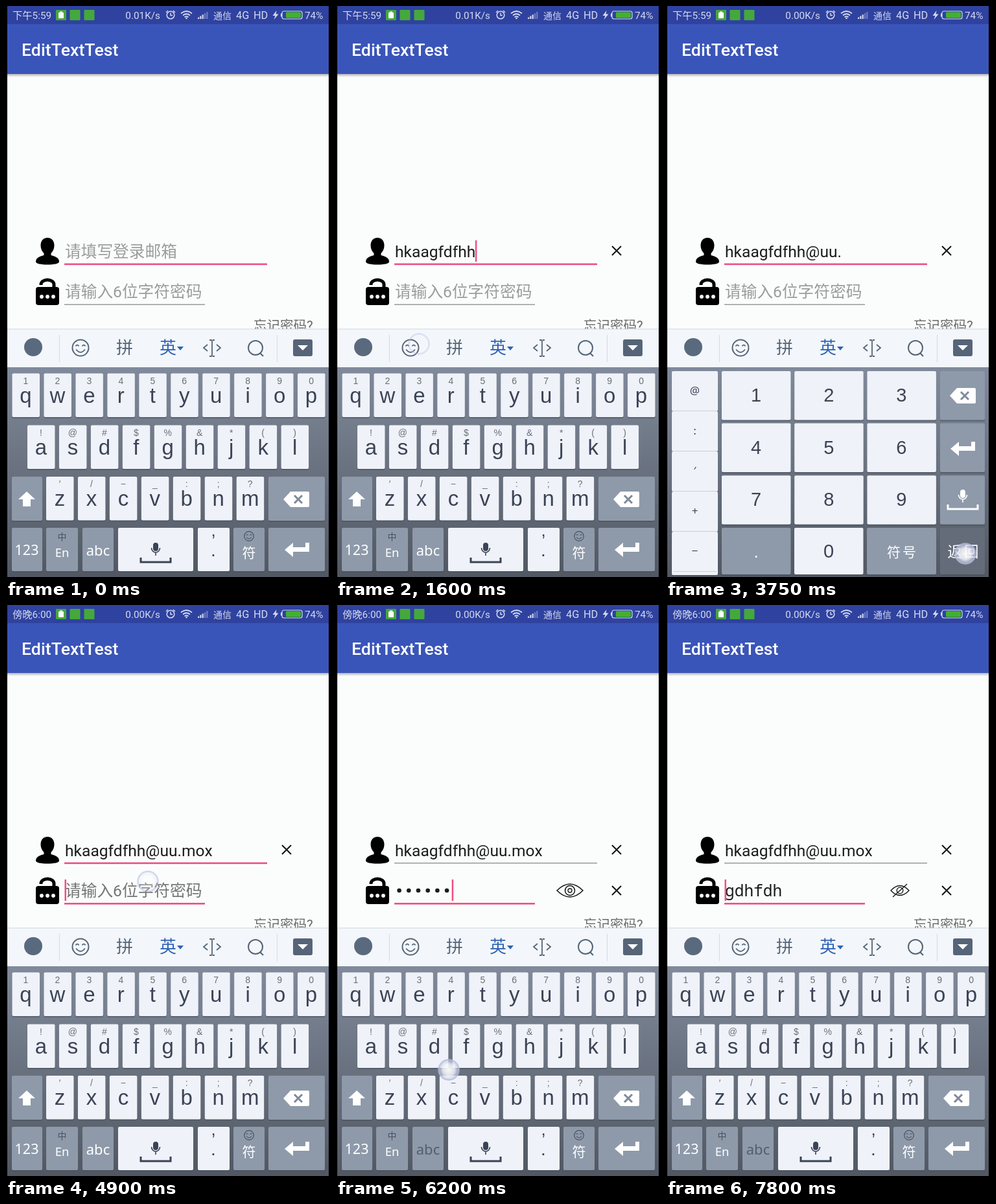
An HTML page that plays this animation: 500 px wide and 882 px high, repeating every 8000 ms.

```html
<!DOCTYPE html>
<html lang="zh">
<head>
<meta charset="utf-8">
<style>
html, body { margin: 0; width: 100%; height: 100%; overflow: hidden; background: #000; }
svg { display: block; width: 500px; height: 882px; font-family: Roboto, 'Noto Sans CJK SC', 'Noto Sans CJK', sans-serif; }
.key { font-family: 'Liberation Sans', 'Noto Sans CJK SC', 'Noto Sans CJK', sans-serif; }
.fn { font-family: 'Noto Sans', 'Noto Sans CJK SC', 'Noto Sans CJK', sans-serif; }
.mono { font-family: 'Noto Sans Mono', monospace; }
</style>
</head>
<body>
<svg id="stage" viewBox="0 0 500 882"></svg>
<script>
const LOOP = 8000, HOLD = 70, FADE = 180;
const INK = '#3b4356', SLATE = '#566477', BLUE = '#2f63b5', PINK = '#f0507f';
const LIGHT = '#eff2f8', GREY = '#8e9aaa', PRESSED = '#646c79';
const keys = {};

const rect = (x, y, w, h, fill, more = '') =>
  `<rect x="${x}" y="${y}" width="${w}" height="${h}" fill="${fill}" ${more}/>`;
const circle = (x, y, r, fill, more = '') =>
  `<circle cx="${x}" cy="${y}" r="${r}" fill="${fill}" ${more}/>`;
const line = (d, stroke, width = 2, more = '') =>
  `<path d="${d}" fill="none" stroke="${stroke}" stroke-width="${width}" ${more}/>`;
const shape = (d, fill) => `<path d="${d}" fill="${fill}"/>`;
const text = (x, y, size, str, fill, more = '') =>
  `<text x="${x}" y="${y}" font-size="${size}" fill="${fill}" ${more}>${str}</text>`;
const mid = (x, y, size, str, fill, more = '') =>
  text(x, y, size, str, fill, `text-anchor="middle" ${more}`);
const group = (id, inner) => `<g id="${id}">${inner}</g>`;

// A keyboard key; a name makes it pressable.
function key(x, y, w, h, fill, name) {
  if (name) keys[name] = { x: x + w / 2, y, h, fill };
  return rect(x, y + 2, w, h, '#4a515d', 'rx="2" opacity=".6"') +
    rect(x, y, w, h, fill, `rx="2" ${name ? `id="key-${name}"` : ''}`);
}

const enterIcon = (x, y) =>
  shape(`M${x - 19} ${y} l13 -11 v7 h19 v-7 h6 v14 h-25 v8z`, '#fff');
const eraseIcon = (x, y) =>
  shape(`M${x - 20} ${y} l11 -12 h27 q2 0 2 2 v20 q0 2 -2 2 h-27z`, '#fff') +
  line(`M${x - 3} ${y - 6} l12 12 m0 -12 l-12 12`, '#7f8a9a', 3);
const micIcon = (x, y, fill, half) =>
  rect(x - 4, y - 9, 8, 13, fill, 'rx="4"') +
  line(`M${x - 6.5} ${y - 1} a6.5 7 0 0 0 13 0 M${x} ${y + 6} v5`, fill, 1.6) +
  line(`M${x - half} ${y + 14} v7 h${2 * half} v-7`, fill, 3);
const smile = (x, y, r, stroke, width) =>
  circle(x, y, r, 'none', `stroke="${stroke}" stroke-width="${width}"`) +
  line(`M${x - r * .55} ${y + r * .2} q${r * .55} ${r * .7} ${r * 1.1} 0
    M${x - r * .6} ${y - r * .2} q${r * .2} ${-r * .3} ${r * .4} 0
    M${x + r * .2} ${y - r * .2} q${r * .2} ${-r * .3} ${r * .4} 0`, stroke, width * .9);
const cross = y => line(`M426 ${y - 7} l14 14 m0 -14 l-14 14`, '#111', 2);

function statusBar() {
  const c = '#d5daf0';
  const face = x => rect(x, 6, 16, 16, '#45a83c', 'rx="1"');
  let s = rect(2, 0, 496, 28, '#2f429f') +
    `<text id="clock" x="10" y="20" font-size="15.3" fill="${c}"></text>` +
    face(77) + rect(81, 10, 8, 9, '#fff', 'rx="1"') + rect(83, 8.5, 4, 2, '#fff') +
    face(98.5) + face(120.5) +
    `<text id="speed" x="238" y="20" font-size="15.3" fill="${c}" text-anchor="end"></text>` +
    circle(254, 14, 5.8, 'none', `stroke="${c}" stroke-width="1.5"`) +
    line('M254 10.5 v4 h3 M247 10 l3 -3 M261 10 l-3 -3', c, 1.4) +
    line('M270 11.5 q8.5 -7 17 0 M273 14.5 q5.500 -4.500 11 0 M275.500 17.300 q3 -2.500 6 0', c, 1.7) +
    circle(278.5, 19, 1.3, c);
  for (let i = 0; i < 5; i++)
    s += rect(296 + i * 3.3, 17.5 - i * 2.1, 2.2, 2.5 + i * 2.1, c, i > 2 ? 'opacity=".4"' : '');
  return s + text(320, 19.5, 14, '通信', c) + text(355, 20, 16.3, '4G', c) + text(382, 20, 16.3, 'HD', c) +
    shape('M417.500 7 l-6 8 h4 l-2 6 l7 -8.500 h-4z', c) +
    rect(426, 8, 31, 12, 'none', `rx="3" stroke="${c}" stroke-width="1.2"`) +
    rect(424, 11.5, 2, 5, c) + rect(432, 9.5, 23, 9, '#43b02e', 'rx="1.5"') +
    text(461, 20, 15.3, '74%', c);
}

function form() {
  let dots = '';
  for (let i = 0; i < 6; i++) dots += circle(97.6 + i * 14.7, 441, 3.3, '#1c1c1c', `id="dot${i}"`);
  return rect(2, 28, 496, 77, '#3a55b9') +
    rect(2, 105, 496, 5, 'url(#shade)') +
    text(24, 77, 26.7, 'EditTextTest', '#fff', 'font-weight="500"') +
    shape('M64 358 c7 0 10.500 5 10.500 12 c0 5 -2 9 -5 12 v3 c7 2 12.500 4 12.500 10 c0 3 -8 4.500 -18 4.500 ' +
      's-18 -1.500 -18 -4.500 c0 -6 5.500 -8 12.500 -10 v-3 c-3 -3 -5 -7 -5 -12 c0 -7 3.500 -12 10.500 -12z', '#000') +
    line('M54 431 v-1 a10 7 0 0 1 20 0 v7', '#000', 5) +
    rect(46, 434, 36, 28, '#000', 'rx="4"') +
    [55, 64, 73].map(x => circle(x, 449, 2.9, '#fff')).join('') +
    text(91, 388, 24.7, '请填写登录邮箱', '#9b9b9b', 'id="mailHint"') +
    text(91, 388, 24.6, '', '#1c1c1c', 'id="mail"') + group('mailX', cross(378)) +
    rect(90, 397.5, 313, 2.6, PINK, 'id="mailLine"') +
    text(91, 450, 24.7, '请输入6位字符密码', '#9b9b9b', 'id="passHint"') +
    text(91, 450, 24.5, '', '#1c1c1c', 'id="pass" class="mono"') + group('dots', dots) +
    rect(90, 460, 217, 2.6, PINK, 'id="passLine"') +
    group('passX', cross(441)) +
    group('eye', line('M341 441 q20 -20 40 0 q-20 20 -40 0z', '#111', 1.5) +
      circle(361, 441, 7.5, 'none', 'stroke="#111" stroke-width="1.5"') +
      circle(361, 441, 3, 'none', 'stroke="#111" stroke-width="1.3"')) +
    group('eyeOff', line('M347 441 q14 -15 28 0 q-14 15 -28 0z M350 451 l22 -20', '#111', 1.3) +
      circle(361, 441, 4.8, 'none', 'stroke="#111" stroke-width="1.3"')) +
    rect(0, 0, 2.5, 33, PINK, 'id="caret"') +
    text(382, 500.5, 20.5, '忘记密码?', '#6a6a6a');
}

function strip() {
  return rect(2, 499, 496, 59, '#f3f7fb') + rect(2, 498.5, 496, 1, '#cfd6dc') +
    group('tools', circle(42, 527, 14, '#5a6a7e') +
      line('M82.500 508 v42 M418.500 508 v42', '#d3dae2', 1) +
      smile(115, 528, 12.5, SLATE, 2) +
      mid(183, 537, 26, '拼', SLATE) + mid(250, 537, 26, '英', BLUE) +
      shape('M264 526 h10 l-5 6z', BLUE) +
      line('M314 516 h3 q1 0 1 2 v21 q0 2 -1 2 h-3 M322 516 h-3 M322 541 h-3', SLATE, 1.8) +
      line('M311 523 l-6 5 l6 5 M325 523 l6 5 l-6 5', SLATE, 1.8) +
      circle(385, 528, 11, 'none', `stroke="${SLATE}" stroke-width="2"`) +
      line('M392 536 l5 5', SLATE, 2.2) +
      rect(443, 515, 30, 26, SLATE, 'rx="3"') + shape('M450 524 h16 l-8 8z', '#fff')) +
    text(24, 540, 30.7, '', BLUE, 'id="word"');
}

function letters() {
  let s = '';
  const row = (chars, hints, left, top) => [...chars].forEach((c, i) => {
    const x = left + i * 48.95;
    s += key(x, top, 42.5, 67.5, LIGHT, c) +
      mid(x + 21, top + 16, 14, hints[i], '#6a6f78', 'class="key"') +
      mid(x + 21, top + 45, 33, c, INK, 'class="key"');
  });
  row('qwertyuiop', '1234567890', 9.5, 567.5);
  row('asdfghjkl', ['!', '@', '#', '$', '%', '&amp;', '*', '(', ')'], 33, 647.5);
  row('zxcvbnm', '′/−_:;?', 62, 727);
  const fn = 'class="fn"';
  return s + key(9, 727, 47, 68, GREY) + shape('M32 750 l13 12 h-7 v11 h-12 v-11 h-7z', '#fff') +
    key(405, 727, 87, 68, GREY) + eraseIcon(448, 762) +
    key(9, 806, 47, 67, GREY, '123') + mid(32, 848, 21.5, '123', '#fff', fn) +
    key(62, 806, 49, 67, GREY) + mid(86.5, 825, 14, '中', '#4b525e') + mid(86.5, 851, 18.5, 'En', '#fff', fn) +
    key(118, 806, 48, 67, GREY) + mid(142, 849, 22, 'abc', '#fff', 'class="fn" id="abc"') +
    key(173, 806, 116, 67, LIGHT) + micIcon(231, 838, INK, 23) +
    key(296, 806, 49, 67, LIGHT) + mid(320, 819, 26, ',', INK, 'class="key"') + mid(320, 850, 28, '.', INK, 'class="key"') +
    key(351, 806, 48, 67, GREY) + smile(375, 819, 7.3, '#4b525e', 1.2) + mid(375, 852, 21, '符', '#fff', 'font-weight="500"') +
    key(405, 806, 87, 67, GREY) + group('enter', enterIcon(449, 840)) +
    mid(450, 849, 22, '确认', '#fff', 'id="confirm" font-weight="500" letter-spacing="4"');
}

function numbers() {
  let s = '';
  ['@', ':', '′', '+', '−'].forEach((c, i) => {
    s += key(9, 564 + i * 62, 71, i < 4 ? 62 : 67, LIGHT, i ? '' : '@') +
      rect(11, 625 + i * 62, 67, 1, '#c9cfd8') +
      mid(44.5, 600 + i * 62, 17, c, INK, 'class="fn"');
  });
  for (let i = 0; i < 9; i++) {
    const x = 86 + i % 3 * 112.2, y = 564 + (i / 3 | 0) * 80.6;
    s += key(x, y, 106.5, 75.5, LIGHT) + mid(x + 53, y + 47, 29, i + 1, INK, 'class="key"');
  }
  const bold = 'font-weight="500" letter-spacing="3"';
  return s + key(86, 806, 106.5, 72, GREY, 'dot') + mid(139, 852, 26, '.', '#fff', 'class="key"') +
    key(198, 806, 106.5, 72, LIGHT) + mid(251, 852, 29, '0', INK, 'class="key"') +
    key(310, 806, 107, 72, GREY) + mid(365, 851, 21, '符号', '#fff', bold) +
    key(423, 564, 69, 75.500, GREY) + eraseIcon(458, 602) +
    key(423, 644.6, 69, 75.500, GREY) + enterIcon(458, 684) +
    key(423, 725.2, 69, 75.500, GREY) + micIcon(458, 756, '#fff', 23) +
    key(423, 806, 69, 72, GREY, 'back') + mid(460, 851, 22.5, '返回', '#fff', bold);
}

const stops = list => list.map(([o, c, a = 1]) =>
  `<stop offset="${o}" stop-color="${c}" stop-opacity="${a}"/>`).join('');
document.getElementById('stage').innerHTML = `<defs>
  <linearGradient id="board" x2="0" y2="1">${stops([[0, '#808a9b'], [.5, '#69717f'], [1, '#515863']])}</linearGradient>
  <linearGradient id="shade" x2="0" y2="1">${stops([[0, '#000', .28], [1, '#000', 0]])}</linearGradient>
  <radialGradient id="glow">${stops([[0, '#fff', .95], [.6, '#f4f5fa', .85], [1, '#c3c8dc', .55]])}</radialGradient></defs>` +
  rect(0, 0, 500, 882, '#000') + rect(2, 28, 496, 854, '#fbfdfd') +
  statusBar() + form() + strip() + rect(2, 558, 496, 324, 'url(#board)') +
  group('letters', letters()) + group('numbers', numbers()) +
  group('popup', rect(-3, 88, 6, 16, '#69717f') +
    rect(-38.500, 1.5, 77, 88, '#626a78', 'rx="2" opacity=".5"') +
    rect(-38.500, 0, 77, 87, '#f1f4f9', 'rx="2" stroke="#c4cad4"') +
    mid(0, 60, 46, '', BLUE, 'id="popChar" class="key"')) +
  group('touch', circle(0, 0, 15, 'url(#glow)', 'id="core"') +
    circle(0, 0, 15.500, 'none', 'stroke="#b4bce4" stroke-width="2.5" opacity=".8"'));

const el = {};
document.querySelectorAll('[id]').forEach(e => el[e.id] = e);
const show = (id, on) => el[id].style.display = on ? '' : 'none';
const put = (id, str) => { if (el[id].textContent !== str) el[id].textContent = str; };

// Each tap: press time, key or action.
const taps = [];
const type = (word, start, step) => [...word].forEach((c, i) => taps.push([start + i * step, c]));
type('hkaagf', 80, 130);
type('dfhh', 870, 133);
taps.push([1440, 'pick'], [1750, '123'], [1960, '@'], [2130, 'back']);
type('uu', 2300, 150);
taps.push([3540, '123'], [3620, 'dot'], [3720, 'back']);
type('mox', 3860, 140);
taps.push([4360, 'pick'], [4780, 'field']);
type('gdhfdh', 5250, 140);
taps.push([6160, 'slip'], [6750, 'eye'], [7230, 'eye'], [7545, 'eye']);

const spots = { pick: [128, 522], field: [219, 427], slip: [174, 718], eye: [356, 440],
  back: [462, 846], dot: [139, 846], '123': [34, 842], '@': [44, 600] };
const spot = name => spots[name] || [keys[name].x, keys[name].y + 3.5];

function stateAt(t) {
  const s = { mail: '', word: '', pass: '', numeric: false, inPass: false, plain: false, home: false, blink: 0 };
  for (const [start, name] of taps) {
    const up = start + HOLD;
    if (t < up) break;
    if (name === '123') { s.numeric = true; s.word = ''; }
    else if (name === 'back') s.numeric = false;
    else if (name === 'pick') { s.word = ''; s.blink = up; }
    else if (name === 'field') { s.inPass = true; s.blink = up; }
    else if (name === 'eye') { s.plain = !s.plain; s.home = true; s.blink = up; }
    else if (name === '@') { s.mail += '@'; s.blink = up; }
    else if (name === 'dot') { s.mail += '.'; s.blink = up - 460; }
    else if (name !== 'slip') {
      if (s.inPass) s.pass += name;
      else { s.mail += name; s.word += name; }
      s.blink = up;
    }
  }
  return s;
}

function underline(id, on, y) {
  el[id].setAttribute('fill', on ? PINK : '#8a8a8a');
  el[id].setAttribute('y', on ? y : y + .5);
  el[id].setAttribute('height', on ? 2.6 : 1.3);
}

function draw(t) {
  const s = stateAt(t), n = s.pass.length;
  put('clock', t < 4550 ? '下午5:59' : '傍晚6:00');
  put('speed', t < 2200 ? '0.01K/s' : '0.00K/s');

  put('mail', s.mail);
  show('mailHint', !s.mail);
  show('mailX', s.mail);
  underline('mailLine', t < 4950, 397.5);
  put('pass', s.plain ? s.pass : '');
  show('passHint', !n);
  el.passHint.setAttribute('fill', s.inPass ? '#747474' : '#9b9b9b');
  show('dots', !s.plain);
  for (let i = 0; i < 6; i++) show('dot' + i, i < n);
  show('passX', n);
  show('eye', n && !s.plain);
  show('eyeOff', n && s.plain);
  underline('passLine', s.inPass, 460);

  const width = s.inPass ? (s.home ? 0 : n * 14.7) : s.mail ? el.mail.getComputedTextLength() : 0;
  show('caret', (t - s.blink) % 1000 < 500 && t > 80);
  el.caret.setAttribute('x', 90.5 + width);
  el.caret.setAttribute('y', s.inPass ? 424 : 362);

  put('word', s.word);
  show('tools', !s.word);
  show('enter', !s.word);
  show('confirm', s.word);
  show('letters', !s.numeric);
  show('numbers', s.numeric);
  el.abc.setAttribute('fill', t < 5000 ? '#fff' : '#555d69');

  const tap = taps.filter(([start]) => start <= t).pop();
  const age = tap ? t - tap[0] : Infinity, held = age < HOLD;
  for (const k in keys) el['key-' + k].setAttribute('fill', held && tap[1] === k ? PRESSED : keys[k].fill);
  const letter = held && /^[a-z]$/.test(tap[1]);
  show('popup', letter);
  if (letter) {
    const k = keys[tap[1]];
    put('popChar', tap[1]);
    el.popup.setAttribute('transform', `translate(${k.x} ${k.y - 110})`);
  }
  show('touch', age < HOLD + FADE);
  if (age < HOLD + FADE) {
    const gone = Math.max(0, (age - HOLD) / FADE);
    el.touch.setAttribute('transform', `translate(${spot(tap[1])})`);
    el.touch.setAttribute('opacity', 1 - gone);
    el.core.setAttribute('opacity', Math.max(0, 1 - gone * 2));
  }
}

function frame() {
  draw(performance.now() % LOOP);
  requestAnimationFrame(frame);
}
frame();
</script>
</body>
</html>
```
